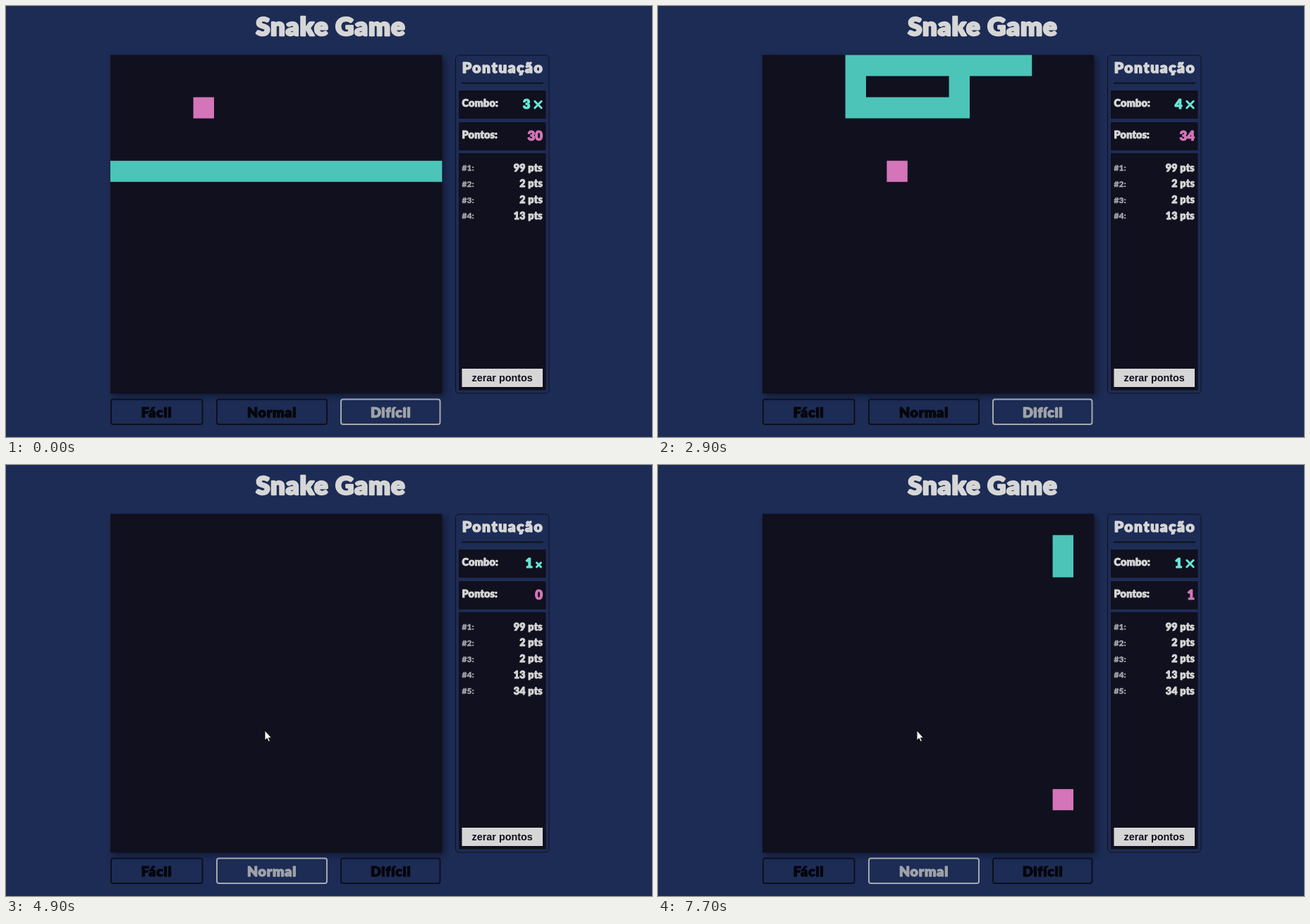
These frames come from a looping animation (916 by 612 pixels, 7900 ms). An HTML page:

```html
<!DOCTYPE html>
<html lang="pt-BR">
<head>
<meta charset="utf-8">
<title>Snake Game</title>
<style>
  :root { --bg: #1d2c55; --dark: #10101e; --light: #d6d6d6; --teal: #4dc4b8; --pink: #d375b8; }
  html, body { margin: 0; width: 100%; height: 100%; overflow: hidden; background: var(--bg); }
  svg { display: block; width: 916px; height: 612px; }
  text {
    font: 900 16px Lato, sans-serif; fill: var(--light); stroke: var(--light);
    stroke-width: .065em; stroke-linejoin: round; white-space: pre;
  }
  .mid { text-anchor: middle; }
  .end { text-anchor: end; }
  .box { fill: var(--dark); }
  .board { fill: var(--dark); filter: drop-shadow(4px 4px 4px rgba(0, 0, 0, .4)); }
  .outline { fill: none; stroke: var(--dark); }
  .title { font-size: 36.5px; letter-spacing: .9px; }
  .head { font-size: 21px; letter-spacing: 1.6px; }
  .label { font-size: 14.5px; letter-spacing: .1px; }
  .value { font-size: 18.5px; }
  .rank { font-size: 12px; fill: #a2a2a8; stroke: #a2a2a8; stroke-width: .03em; }
  .pts { font-size: 14.2px; letter-spacing: .3px; }
  #combo { fill: #66e8d8; stroke: #66e8d8; }
  #times { fill: none; stroke: #66e8d8; stroke-width: 3px; stroke-linecap: round; }
  #score { fill: var(--pink); stroke: var(--pink); }
  .reset { font: bold 14.4px "Liberation Sans", Arial, sans-serif; fill: var(--dark); stroke: none; }
  .level rect { fill: none; stroke: #0d0f1c; stroke-width: 2px; }
  .level text { font-size: 19.5px; letter-spacing: .8px; fill: #06070d; stroke: #06070d; }
  .level.on rect { stroke: #a6a8ad; }
  .level.on text { fill: #a0a2a8; stroke: #a0a2a8; }
  #snake { fill: var(--teal); }
  #food { fill: var(--pink); }
  .dialog { fill: #12101f; }
  .over { font-size: 45px; letter-spacing: 2px; word-spacing: 4px; }
  .ask { font-size: 21px; letter-spacing: 1.5px; }
  .answer rect { fill: var(--teal); }
  .answer text { font-size: 19.5px; letter-spacing: .4px; fill: var(--dark); stroke: var(--dark); }
  .answer.hover rect {
    x: 317px; y: 362px; width: 108px; height: 41px;
    fill: var(--pink); stroke: var(--light); stroke-width: 2px;
  }
  .cursor { fill: #fff; stroke: #111; stroke-width: 1px; stroke-linejoin: round; }
</style>
</head>
<body>
<svg viewBox="0 0 916 612">
  <rect width="916" height="612" fill="var(--bg)"/>
  <text class="title mid" x="460.4" y="41.5">Snake Game</text>

  <rect class="board" x="148" y="69.4" width="470.4" height="481"/>
  <rect id="food" width="29.4" height="30.06"/>
  <path id="snake"/>

  <rect class="outline" x="637.5" y="69.9" width="132.5" height="480" rx="5"/>
  <text class="head mid" x="704.5" y="94.5">Pontuação</text>
  <rect class="box" x="646" y="108.5" width="116" height="2"/>
  <rect class="box" x="642" y="120" width="123.5" height="40"/>
  <rect class="box" x="642" y="165" width="123.5" height="40"/>
  <rect class="box" x="642" y="209" width="123.5" height="336.5"/>
  <text class="label" x="646.6" y="143.3">Combo:</text>
  <text id="combo" class="value end" y="146.3"></text>
  <path id="times"/>
  <text class="label" x="646.6" y="188.3">Pontos:</text>
  <text id="score" class="value end" x="761" y="191"></text>
  <g id="ranks"></g>
  <rect x="646.5" y="515" width="114.5" height="26" fill="var(--light)"/>
  <text class="reset mid" x="703.7" y="532.5">zerar pontos</text>

  <g class="level"><rect x="149" y="558.5" width="129.5" height="35.5" rx="3"/><text class="mid" x="213.5" y="583.5">Fácil</text></g>
  <g class="level" id="normal"><rect x="299" y="558.5" width="156" height="35.5" rx="3"/><text class="mid" x="377" y="583.5">Normal</text></g>
  <g class="level" id="hard"><rect x="475" y="558.5" width="140.5" height="35.5" rx="3"/><text class="mid" x="545.7" y="583.5">Difícil</text></g>

  <g id="modal">
    <rect width="916" height="612" opacity=".9"/>
    <rect class="dialog" x="274" y="169" width="371" height="276" rx="7"/>
    <text class="over mid" x="460" y="247.5">Game Over!!!</text>
    <text class="ask mid" x="460" y="314.7">Deseja jogar outra partida?</text>
    <g class="answer" id="yes"><rect x="316" y="361" width="110" height="43" rx="5"/><text class="mid" x="370.7" y="389.5">Sim</text></g>
    <g class="answer"><rect x="493" y="361" width="110" height="43" rx="5"/><text class="mid" x="548.2" y="389.5">Não</text></g>
  </g>

  <path id="arrow" class="cursor" d="M0 0V14L3.2 11.2 5.2 15.8 7.4 14.8 5.4 10.4H9.6Z"/>
  <path id="hand" class="cursor" d="M0 7V-.5a1.5 1.5 0 0 1 3 0V4q1.5-1 2.4.3 1.6-.6 2.2.6 1.9-.3 1.9 1.3V9q0 3-2 5H1.5Q0 11-3 8-3.5 6-1.7 6Z"/>
</svg>
<script>
const LOOP = 7900, OVER = 3100, RESTART = 4900, READY = 5000;
const CELL_W = 29.4, CELL_H = 30.06, COLS = 16;
const STEP = { L: [-1, 0], R: [1, 0], U: [0, -1], D: [0, 1] };
const $ = id => document.getElementById(id);
const show = (el, on) => el.style.display = on ? '' : 'none';
const place = ([c, r]) => [148 + c * CELL_W, 69.4 + r * CELL_H];
const count = (times, t) => times.filter(v => v <= t).length;

// Expands a route such as "L15U5" into the list of visited cells.
function walk(start, route) {
  const cells = [start];
  for (const [, dir, n] of route.matchAll(/([LRUD])(\d+)/g)) {
    for (let i = 0; i < n; i++) {
      const [c, r] = cells.at(-1), [dc, dr] = STEP[dir];
      cells.push([(c + dc + COLS) % COLS, r + dr]);
    }
  }
  return cells;
}

const games = [
  {
    cells: walk([11, 5], 'L15U5L8D2R5U2'), size: 16, eat: 15,
    ticks: [600, 700, 900, 1000, 1100, 1200, 1300, 1400, 1600, 1700, 1800, 1900, 2000,
            2200, 2300, 2400, 2500, 2800, 2800, 2900, 2900, 3100],
    foods: [[4, 2], [6, 5]], combo: [3, 4], score: [30, 34]
  },
  {
    cells: walk([8, 8], 'R6U7'), size: 1, eat: 9,
    ticks: [5300, 5500, 5700, 6100, 6100, 6300, 6500, 6700, 6900, 7200, 7300, 7600, 7700],
    foods: [[14, 5], [14, 13]], combo: [1, 1], score: [0, 1]
  }
];

// time, x, y of the pointer tip
const pointer = [
  [3900, 256, 413], [4000, 303, 403], [4100, 344, 390],
  [4200, 369, 379], [4400, 367, 378], [4600, 367, 377]
];

$('ranks').innerHTML = [99, 2, 2, 13, 34].map((pts, i) => {
  const y = 234.6 + i * 22.85;
  return `<g><text class="rank" x="646.6" y="${y - .8}">#${i + 1}:</text>` +
    `<text class="pts end" x="761" y="${y}">${pts} pts</text></g>`;
}).join('');

function drawGame(t) {
  const second = t >= RESTART, g = games[+second];
  const moves = count(g.ticks, t);
  const ate = +(moves >= g.eat), scored = +(moves >= g.eat - 1);
  const end = g.size + moves, length = g.size + ate;
  const visible = !second || t >= READY;

  $('snake').setAttribute('d', g.cells.slice(end - length, end).map(cell => {
    const [x, y] = place(cell);
    return `M${x} ${y}h${CELL_W}v${CELL_H}h${-CELL_W}z`;
  }).join(''));
  const [fx, fy] = place(g.foods[ate]);
  $('food').setAttribute('x', fx);
  $('food').setAttribute('y', fy);
  show($('snake'), visible);
  show($('food'), visible);

  const small = second && !scored;
  $('combo').textContent = g.combo[scored];
  $('combo').setAttribute('x', small ? 747 : 743.5);
  $('times').setAttribute('d', small
    ? 'M752.5 138.8l6 6m0-6l-6 6'
    : 'M749.8 135.3l9.4 9.4m0-9.4l-9.4 9.4');
  $('score').textContent = g.score[scored];
  show($('ranks').lastChild, second);
  $('normal').classList.toggle('on', second);
  $('hard').classList.toggle('on', !second);
}

function drawPointer(t) {
  const p = pointer.findLast(([at]) => at <= t);
  const hover = t >= 4100 && t < RESTART;
  show($('arrow'), p && !hover);
  show($('hand'), p && hover);
  $('yes').classList.toggle('hover', hover);
  if (p) for (const id of ['arrow', 'hand']) {
    $(id).setAttribute('transform', `translate(${p[1]} ${p[2]})`);
  }
}

const origin = performance.now();
function frame() {
  const t = (performance.now() - origin) % LOOP;
  drawGame(t);
  drawPointer(t);
  show($('modal'), t >= OVER && t < RESTART);
  requestAnimationFrame(frame);
}
frame();
</script>
</body>
</html>
```
